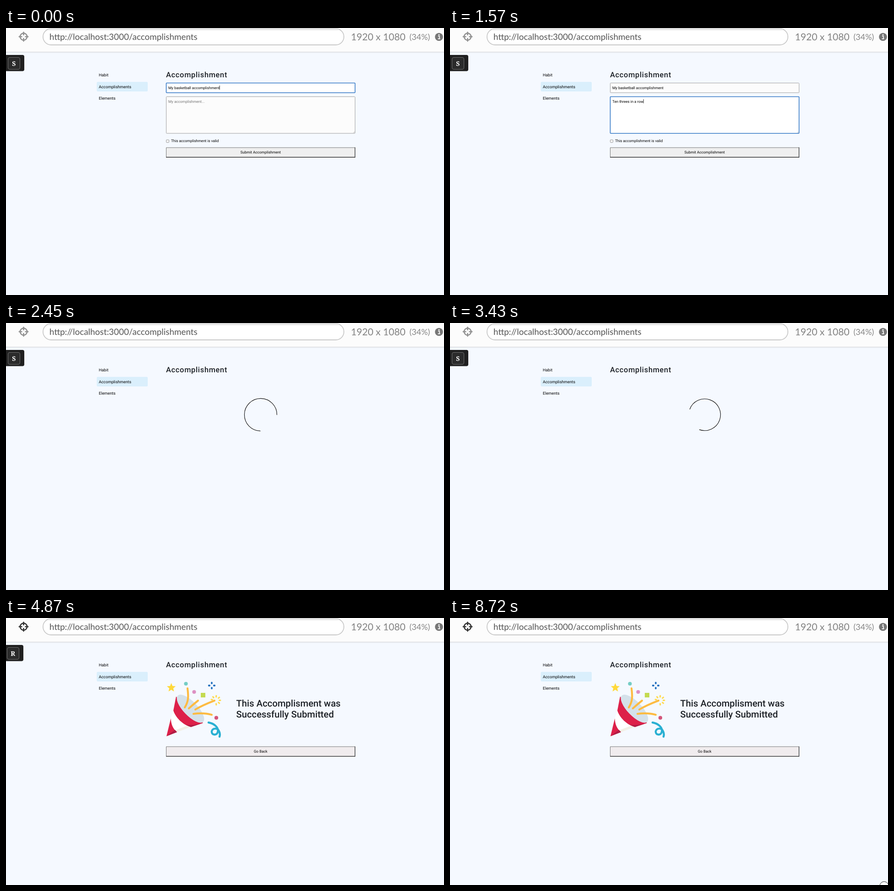
Write an HTML page that moves like this. It is 958x585 px and loops after 8820 ms.

```html
<!DOCTYPE html>
<html lang="en">
<head>
<meta charset="utf-8">
<title>Accomplishment form</title>
<style>
  html, body { margin: 0; width: 100%; height: 100%; overflow: hidden; background: #f5f9ff; }
  svg { display: block; width: 958px; height: 585px; font: 8.08px Roboto, sans-serif; text-rendering: geometricPrecision; }
  .bar { font-family: Lato, sans-serif; }
  .nav { font-size: 8.8px; }
  .title { font-size: 16.4px; font-weight: 500; letter-spacing: .68px; fill: #1d2126; }
  .done { font-size: 20.25px; font-weight: 500; fill: #1d2126; }
  .mid { text-anchor: middle; }
  .key { font: bold 14px "Noto Serif", serif; fill: #fff; text-anchor: middle; }
  .field { fill: #fcfcfc; stroke: #a0a0a0; }
  .field.on { fill: #fff; stroke: #3478c6; stroke-width: 1.6; }
  .line { fill: none; stroke-linecap: round; }
</style>
</head>
<body>
<svg viewBox="0 0 958 585">
  <defs>
    <linearGradient id="shade" x2="0" y2="1">
      <stop stop-color="#000" stop-opacity=".08"/>
      <stop offset="1" stop-color="#000" stop-opacity="0"/>
    </linearGradient>
    <g id="button">
      <path d="M350.5 .5H763.5V21.7H350.5Z" stroke="#777"/>
      <path d="M350 21.7H763.4V0" fill="none" stroke="#3c3c3c" stroke-width="1.4"/>
    </g>
  </defs>

  <!-- browser bar -->
  <rect y="52" width="958" height="4" fill="url(#shade)"/>
  <rect width="958" height="52" fill="#fcfcfc"/>
  <path d="M0 52.5H958" stroke="#dadbdd"/>
  <rect x="81" y="1.5" width="658" height="35.5" rx="17.7" fill="#fff" stroke="#c9c9c9" stroke-width="1.8"/>
  <path d="M92 4H728" stroke="#f0f0f0" stroke-width="3"/>
  <g id="aim" fill="none" stroke-width="2.6">
    <circle cx="38.5" cy="19" r="7.6"/>
    <path d="M38.5 8.2V16M38.5 22V29.8M27.7 19H35.5M41.5 19H49.3"/>
  </g>
  <g class="bar">
    <text x="95" y="25.5" font-size="18.85" fill="#555">http://localhost:3000/accomplishments</text>
    <text x="754.5" y="26.5" font-size="21.1" fill="#828282">1920 x 1080</text>
    <text x="882.5" y="26" font-size="18" fill="#858585">(34%)</text>
  </g>
  <circle cx="947" cy="19.5" r="8.8" fill="#777"/>
  <path d="M945 18H948V23.4M944.6 23.6H949.6" fill="none" stroke="#fff" stroke-width="1.7"/>
  <circle cx="947" cy="15" r="1.5" fill="#fff"/>

  <!-- shortcut hint -->
  <g id="hint">
    <rect x="-10" y="59" width="50" height="35.5" rx="4" fill="#202020"/>
    <rect x="4.5" y="64.5" width="26" height="26" rx="3.5" fill="#2b2b2b" stroke="#707070"/>
    <text id="key" class="key" x="17.3" y="82.6"></text>
  </g>

  <!-- page -->
  <rect x="198.5" y="118" width="111.5" height="21" rx="2.5" fill="#daeffc"/>
  <g class="nav">
    <text x="203" y="106">Habit</text>
    <text x="203" y="131.5">Accomplishments</text>
    <text x="203" y="156.7">Elements</text>
  </g>
  <text class="title" x="350" y="107.8">Accomplishment</text>

  <g id="form">
    <rect id="name" class="field" x="350.5" y="120.5" width="413" height="21.3" rx="1"/>
    <text id="nameText" x="355" y="133.6">My basketball accomplishment</text>
    <rect id="note" class="field" x="350.5" y="150.5" width="413" height="80.3" rx="1"/>
    <path d="M759.5 230L763 226.5M761.5 230L763 228.5" stroke="#999" stroke-width=".6"/>
    <text id="noteText" x="355" y="163.5"></text>
    <path id="caret" d="M.4 0V9" stroke="#000" stroke-width=".8"/>
    <rect x="350.6" y="245" width="5.8" height="5.8" rx="1" fill="#fff" stroke="#777" stroke-width=".8"/>
    <g id="tick" fill="none">
      <rect x="349" y="243.4" width="9" height="9" rx="1.8" stroke="#3478c6"/>
      <rect x="350.2" y="244.6" width="6.6" height="6.6" rx="1" fill="#0075ff"/>
      <path d="M351.7 248L353.1 249.4L355.5 246.4" stroke="#fff"/>
    </g>
    <text x="361" y="250.2">This accomplishment is valid</text>
    <use href="#button" y="261.6" fill="#efefef"/>
    <text class="mid" x="557" y="275.2">Submit Accomplishment</text>
  </g>

  <circle id="spinner" r="37.4" fill="none" stroke="#111" stroke-width="1.2" pathLength="4" stroke-dasharray="3 1"/>

  <g id="success">
    <path d="M372 172L366 203C370 217 386 234 404 239L431 230Z" fill="#dd2049"/>
    <path d="M394 234Q410 236 430 230.5L404 239Q398 237 394 234" fill="#b11d45"/>
    <path d="M366 203L360.5 220C361 232 365 243 374 250L404 239C386 234 370 217 366 203" fill="#fff"/>
    <path d="M374 250L404 239L396 236L370 246Z" fill="#f2efe6"/>
    <path d="M360.5 220L351 259L374 250C365 243 361 232 360.5 220" fill="#dd2049"/>
    <path d="M351 259L374 250L369.5 245Z" fill="#b11d45"/>
    <ellipse rx="40" ry="15.5" transform="translate(403.5 198.8) rotate(46)" fill="#d4e1ea"/>
    <path class="line" stroke="#fdbb42" stroke-width="4.2" d="M397 154C399 170 400 182 391 196M420 181Q410 189 400 198M456 181Q430 191 414 200.5M410 210Q432 207 450 212"/>
    <path class="line" stroke="#2ab0d2" stroke-width="4.4" d="M443 229C455 231 466 240 463 250C461 258 449 257 450 248C452 241 463 240 466 248Q469 254 467 260"/>
    <path id="star" fill="#ffd93b"/>
    <circle cx="393.5" cy="144" r="4.1" fill="#74cdc5"/>
    <circle cx="411.5" cy="162" r="4.1" fill="#dd90c3"/>
    <circle cx="460" cy="218.7" r="4.1" fill="#d4557a"/>
    <rect x="426" y="164" width="10" height="10" fill="#c4da50"/>
    <path id="plus" class="line" stroke="#2673c0" stroke-width="3.8"/>
    <path id="burst" class="line" stroke="#ffdb52" stroke-width="3.2"/>
    <text class="done" x="503.5" y="193.5">This Accomplisment was</text>
    <text class="done" x="503.5" y="217.5">Successfully Submitted</text>
    <use href="#button" y="281.4" fill="#f0ecee"/>
    <text class="mid" x="557" y="295">Go Back</text>
  </g>

  <circle id="pointer" r="9.5" fill="#fff" stroke="#222"/>
</svg>
<script>
const LOOP = 8820;
const NOTE = "Ten threes in a row";
// Screen refreshes: first, last, count
const RUNS = [[180, 1050, 11], [1140, 1570, 6], [1750, 2630, 11], [2720, 3520, 10],
  [3610, 4420, 10], [4510, 4870, 5], [8100, 8540, 6]];

const $ = id => document.getElementById(id);
const show = (id, on) => $(id).style.display = on ? "" : "none";
const move = (id, x, y, more = "") => $(id).setAttribute("transform", `translate(${x} ${y}) ${more}`);
const polar = (cx, cy, r, deg) => {
  const a = deg * Math.PI / 180;
  return `${cx + r * Math.cos(a)} ${cy + r * Math.sin(a)}`;
};

function rays(id, cx, cy, r1, r2, angles) {
  $(id).setAttribute("d", angles.map(a => `M${polar(cx, cy, r1, a)}L${polar(cx, cy, r2, a)}`).join(""));
}
rays("plus", 450, 148, 4.8, 6.3, [0, 90, 180, 270]);
rays("burst", 459, 180.3, 7.5, 10, [0, 40, 85, 190, 230, 275, 320]);
$("star").setAttribute("d", "M" + Array.from({ length: 10 },
  (_, i) => polar(361.5, 152.7, i % 2 ? 4.6 : 10.2, i * 36 - 90)).join("L") + "Z");

function snap(t) {
  let held = t;
  for (const [first, last, count] of RUNS) {
    const step = (last - first) / (count - 1);
    if (t >= first) held = first + Math.min(count - 1, Math.floor((t - first + 6) / step)) * step;
  }
  return held;
}

function drawForm(t) {
  const typing = t >= 180;
  const onNote = typing && t < 1750;
  const count = Math.min(NOTE.length, 1 + Math.floor((t - 180) / 1390 * 18 + .01));
  $("name").classList.toggle("on", !typing);
  $("note").classList.toggle("on", onNote);
  const note = $("noteText");
  note.textContent = typing ? NOTE.slice(0, count) : "My accomplishment...";
  note.setAttribute("fill", typing ? "#000" : "#757575");
  show("caret", t < 1750);
  show("tick", t >= 1750);
  const text = typing ? note : $("nameText");
  move("caret", 355 + text.getComputedTextLength(), typing ? 156 : 126);
}

function drawSpinner(t) {
  const p = ((t - 1796) / 750) % 1;
  const scale = .8 + .4 * Math.abs(p - .5);
  move("spinner", 557, 201, `rotate(${p * 360 + 135}) scale(${scale})`);
}

function drawPointer(ms, t) {
  const p = (t - 8100) / 440;
  if (ms >= 8720) move("pointer", 949.5, 587);
  else move("pointer", 966 - 28 * p * (1 - p), 568 + 30 * p);
  show("pointer", ms >= 8720 || ms >= 8100 && p < 1);
}

function draw(ms) {
  const t = snap(ms);
  const stage = t < 1796 ? "form" : t < 4505 ? "spinner" : "success";
  for (const id of ["form", "spinner", "success"]) show(id, id === stage);
  if (stage === "form") drawForm(t);
  if (stage === "spinner") drawSpinner(t);

  const ended = t >= 4685;
  $("key").textContent = ended ? "R" : "S";
  move("hint", ended ? -2 : 0, 0);
  show("hint", ms < 7110);
  const dark = Math.max(0, Math.min(1, (t - 4600) / 270));
  const grey = Math.round(145 - 95 * dark);
  $("aim").setAttribute("stroke", `rgb(${grey},${grey},${grey})`);
  drawPointer(ms, t);
}

const start = performance.now();
function tick() {
  draw((performance.now() - start) % LOOP);
  requestAnimationFrame(tick);
}
tick();
</script>
</body>
</html>
```
